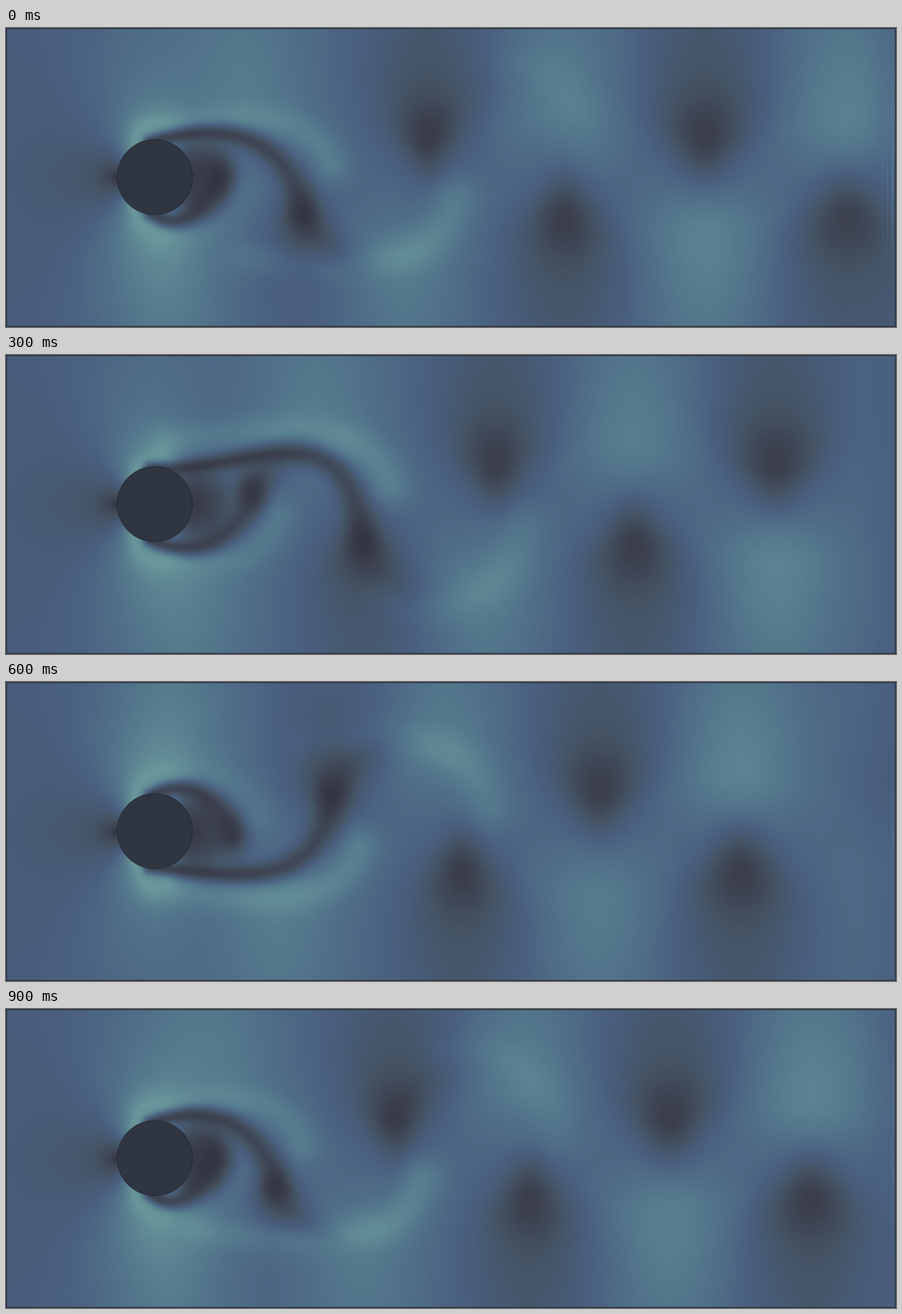
An HTML page with a canvas that plays this animation: 1280 by 431 pixels, repeating every 1000 ms.

```html
<!DOCTYPE html>
<html lang="en">
<head>
<meta charset="utf-8">
<title>Vortex street</title>
<style>
  html, body { margin: 0; width: 100%; height: 100%; overflow: hidden; background: #2e3440; }
  canvas { display: block; width: 100%; height: 100%; }
</style>
</head>
<body>
<canvas id="stage" width="1280" height="431"></canvas>
<script>
const start = performance.now();
const W = 1280, H = 431, MID = H / 2;
const GRID_W = 427, GRID_H = 144;
const CYLINDER = { x: 214, y: 215, r: 54 };
const STEP_TIMES = [0, 100, 300, 400, 500, 600, 800, 900];

// Evenly spaced colours from slow to fast.
const RAMP = ["2b303b", "3c404e", "445364", "4a6080", "557a8d", "69969a"]
  .map(hex => [0, 2, 4].map(i => parseInt(hex.slice(i, i + 2), 16)));

const mix = (a, b, k) => a + (b - a) * k;
const bell = (u, v = 0) => Math.exp(-(u * u + v * v) / 2);
const smooth = (a, b, x) => {
  const k = Math.min(1, Math.max(0, (x - a) / (b - a)));
  return k * k * (3 - 2 * k);
};

function bezier(p, k) {
  const m = 1 - k;
  return [0, 1].map(c =>
    m * m * m * p[0][c] + 3 * m * m * k * p[1][c] + 3 * m * k * k * p[2][c] + k * k * k * p[3][c]);
}

// Soft-edged Bezier line whose width and strength change along its length.
function makeBand(points, w0, w1, a0, a1) {
  const COUNT = 16, nodes = [];
  for (let n = 0; n <= COUNT; n++) {
    const k = n / COUNT, [x, y] = bezier(points, k);
    nodes.push({ x, y, w: mix(w0, w1, k), a: mix(a0, a1, k) });
  }
  const reach = 3.2 * Math.max(w0, w1);
  const left = Math.min(...nodes.map(n => n.x)) - reach;
  const right = Math.max(...nodes.map(n => n.x)) + reach;
  return (x, y) => {
    if (x < left || x > right) return 0;
    let best = 0;
    for (let n = 1; n <= COUNT; n++) {
      const p = nodes[n - 1], q = nodes[n], dx = q.x - p.x, dy = q.y - p.y;
      const k = Math.min(1, Math.max(0, ((x - p.x) * dx + (y - p.y) * dy) / (dx * dx + dy * dy)));
      const w = mix(p.w, q.w, k);
      const d = Math.hypot(x - p.x - k * dx, y - p.y - k * dy) / w;
      if (d < 3.2) best = Math.max(best, mix(p.a, q.a, k) * bell(d));
    }
    return best;
  };
}

// Age counts steps; negative while the vortex still forms behind the cylinder.
// Local heights are positive on the vortex's slow side.
function makeVortex(age, side) {
  const x = 393 + 51 * age + 34 * Math.exp(-0.31 * age);
  const offset = 55 / (1 + Math.exp(-2 * (age + 1.6)));
  const grow = Math.max(0, age);
  const alive = 1 - smooth(1195, 1275, x);
  const place = points => points.map(([px, v]) => [px, MID + side * v]);

  const end = x + 38, arcAmp = 0.2 * bell((age - 1.5) / 4);
  const arc = place([
    [mix(200, end - 105, smooth(0, 9, age)), -70 - 11 * grow],
    [end - 105, -98 - 11 * grow],
    [end - 22, -88 - 8 * grow],
    [end, -20 - 3 * grow]
  ]);
  const layer = place([
    [208, -51],
    [mix(208, x, 0.45), 18 * grow - 80],
    [x - 20, -45 - 22 * Math.exp(0.8 * age)],
    [x, offset]
  ]);
  const tail = place([
    [x, offset], [x + 25, offset + 45], [x + 65, offset + 70], [x + 115, offset + 85]
  ]);

  const bright = [], dark = [];
  if (age < 9) bright.push(makeBand(arc, 16, 20 + grow, arcAmp * 0.6, arcAmp));
  if (age < 3) dark.push(makeBand(layer, 7, 14, 0.8, 0.5));
  if (age > -3 && age < 6) dark.push(makeBand(tail, 15, 20, 0.42 * (1 - smooth(-1, 7, age)), 0));
  return {
    side, x, offset, bright, dark,
    core: alive * mix(0.5, 0.6, smooth(-2, 4, age)),
    coreSize: mix(0.6, 1, smooth(-3, 1, age)),
    coreWidth: 22 + 0.8 * grow,
    halo: alive * 0.37 * smooth(-2.5, 3.5, age),
    fastX: x - 90 * bell((age + 1) / 4),
    fastOffset: mix(122, 85, smooth(4, 12, age)),
    fast: alive * mix(0.15, 0.21, smooth(8, 13, age))
  };
}

function gain(o, x, y) {
  const v = (MID - y) * o.side - o.fastOffset;
  let s = o.fast * bell((x - o.fastX) / 63, v / (v < 0 ? 46 : 130));
  for (const band of o.bright) s += band(x, y);
  return s;
}

function damping(o, x, y) {
  const dx = x - o.x, c = (y - MID) * o.side - o.offset, h = c - 35;
  const coreWidth = o.coreWidth * (1 + 0.3 * Math.tanh(c / 40));
  const haloWidth = 56 * (1 + 0.2 * Math.tanh(h / 60));
  const core = o.core * bell(dx / coreWidth / o.coreSize, c / (c < 0 ? 34 : 44) / o.coreSize);
  const halo = o.halo * bell(dx / haloWidth, h / (h < 0 ? 52 : 165));
  let k = (1 - core) * (1 - halo);
  for (const band of o.dark) k *= 1 - band(x, y);
  return k;
}

// Ideal flow round the cylinder, its influence fading downstream.
function baseSpeed(x, y) {
  const dx = x - CYLINDER.x, dy = y - CYLINDER.y;
  const r2 = Math.max(dx * dx + dy * dy, CYLINDER.r ** 2);
  const k = CYLINDER.r ** 2 / (r2 * r2);
  const u = 1 - k * (dx * dx - dy * dy), v = 2 * k * dx * dy;
  const fade = dx > 0 ? Math.exp(-((dx / 75) ** 2)) : 1;
  const speed = 1 + (Math.hypot(u, v) - 1) * fade;
  return 0.57 * speed + 0.08 * smooth(40, 220, x) - 0.05 * smooth(1215, 1280, x);
}

// Still water enclosed behind the cylinder.
function wakeDamping(x, y) {
  const r2 = ((x - 270) / 54) ** 2 + ((y - MID) / 53) ** 2;
  return 1 - 0.62 * Math.exp(-r2 * r2);
}

function colourOf(s) {
  const p = Math.min(0.9999, Math.max(0, s)) * (RAMP.length - 1), i = Math.floor(p);
  return RAMP[i].map((c, n) => mix(c, RAMP[i + 1][n], p - i));
}

function renderField(pose) {
  const vortices = [];
  for (let age = pose - 8; age < 19; age += 4) {
    if (age > -6) vortices.push(makeVortex(age, (age - pose) % 8 === 0 ? 1 : -1));
  }
  const canvas = document.createElement("canvas");
  canvas.width = GRID_W;
  canvas.height = GRID_H;
  const ctx = canvas.getContext("2d"), image = ctx.createImageData(GRID_W, GRID_H);
  for (let j = 0, n = 0; j < GRID_H; j++) {
    for (let i = 0; i < GRID_W; i++, n += 4) {
      const x = (i + 0.5) * W / GRID_W, y = (j + 0.5) * H / GRID_H;
      let s = baseSpeed(x, y);
      for (const o of vortices) s += gain(o, x, y);
      s = Math.min(s, 1) * wakeDamping(x, y);
      for (const o of vortices) s *= damping(o, x, y);
      image.data.set([...colourOf(s), 255], n);
    }
  }
  ctx.putImageData(image, 0, 0);
  return canvas;
}

const ctx = document.getElementById("stage").getContext("2d");
ctx.imageSmoothingQuality = "high";
const fields = [0, 1, 2, 3].map(renderField);

// Faint ripples while a vortex crosses the outlet.
function drawOutlet(pose) {
  const alpha = 0.22 * Math.abs(pose - 2);
  for (let i = 0; i < 3; i++) {
    const g = ctx.createLinearGradient(0, 70, 0, 360);
    g.addColorStop(0, "rgba(88,130,165,0)");
    g.addColorStop(0.5, `rgba(88,130,165,${alpha / (i + 1)})`);
    g.addColorStop(1, "rgba(88,130,165,0)");
    ctx.fillStyle = g;
    ctx.fillRect(1273 - 7 * i, 70, 3, 290);
  }
}

// The second half of the loop mirrors the first.
function draw(step) {
  const pose = step % 4, flipped = step >= 4;
  ctx.setTransform(1, 0, 0, flipped ? -1 : 1, 0, flipped ? H : 0);
  ctx.drawImage(fields[pose], 0, 0, W, H);
  drawOutlet(pose);

  ctx.setTransform(1, 0, 0, 1, 0, 0);
  ctx.beginPath();
  ctx.arc(CYLINDER.x, CYLINDER.y, CYLINDER.r, 0, Math.PI * 2);
  ctx.fillStyle = "#2f3541";
  ctx.fill();
  ctx.strokeStyle = "rgba(38,43,53,.7)";
  ctx.lineWidth = 1.5;
  ctx.stroke();

  ctx.strokeStyle = "#2e3440";
  ctx.lineWidth = 3;
  ctx.strokeRect(0, 0, W, H);
}

let shown = -1;
function tick() {
  const t = (performance.now() - start) % 1000;
  const step = STEP_TIMES.filter(s => s <= t).length - 1;
  if (step !== shown) draw(shown = step);
  requestAnimationFrame(tick);
}
tick();
</script>
</body>
</html>
```
